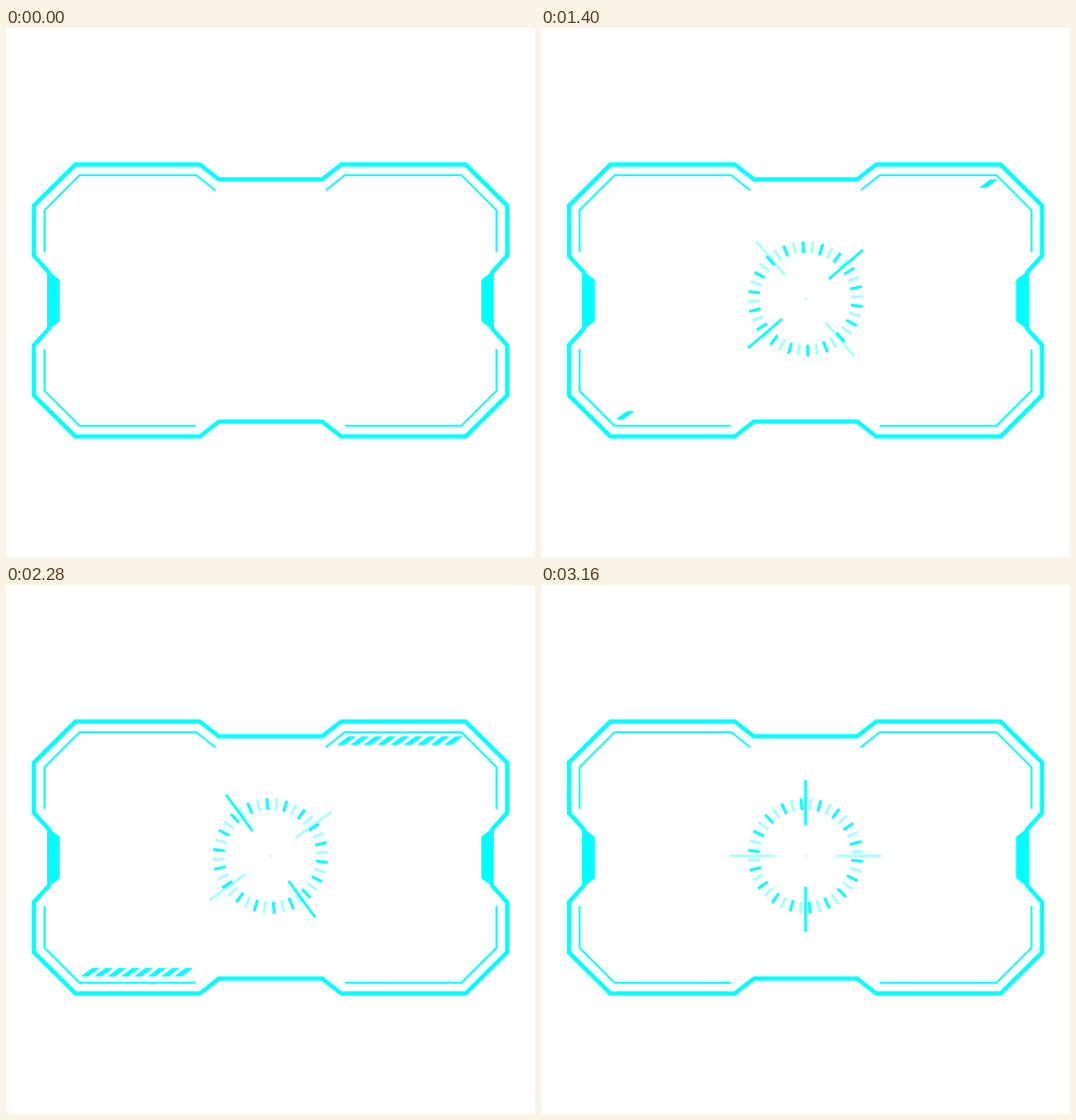
Recreate the animation shown at these times as an HTML page. Size 748 px wide and 748 px high, loop 3200 ms.

```html
<!DOCTYPE html>
<html lang="en">
<head>
<meta charset="utf-8">
<title>HUD frame</title>
<style>
  html, body { margin: 0; width: 100%; height: 100%; overflow: hidden; background: #fff; }
  svg { display: block; width: 100%; height: 100%; }
</style>
</head>
<body>
<svg viewBox="0 0 748 748" fill="none" stroke="#0ff">
  <path stroke-width="6" d="M62 347L39.5 322V251L98 193H274L301 214H447L474 193H650L708.500 251V322L686 347
    M62 423.500L39.500 448.500V519.500L98 577.500H274L301 556.500H447L474 577.500H650L708.500 519.500V448.500L686 423.500"/>
  <path fill="#0ff" stroke="none" d="M58 342L76 356V414.500L58 428.500ZM690 342L672 356V414.500L690 428.500Z"/>
  <path stroke-width="2.700" d="M54.500 316.500V257.500L104 208H269L296 229.500M693.500 316.500V257.500L644 208H479L452 229.500
    M54.500 454V513L104 562.300H268.500M693.500 454V513L644 562.300H479.500"/>
  <g id="topBars" fill="#0ff" stroke="none"></g>
  <g id="bottomBars" fill="#0ff" stroke="none"></g>
  <g id="ring" stroke-width="4"></g>
  <g id="cross" stroke-width="3.600">
    <path d="M0 -107V-43.500M0 43.500V107"/>
    <path opacity=".35" d="M-107 0H-43.500M43.500 0H107"/>
    <circle r="1.700" fill="#0ff" stroke="none" opacity=".35"/>
  </g>
</svg>
<script>
const LOOP = 3200, FRAME = 40, BARS = 9, PITCH = 18.9, STEP = 80;
const byId = id => document.getElementById(id);
const clamp = (v, lo, hi) => Math.min(hi, Math.max(lo, v));
const progress = (t, start, length) => clamp((t - start) / length, 0, 1);
const smooth = u => u * u * (3 - 2 * u);

function addPath(parent, d, opacity = 1) {
  const path = document.createElementNS('http://www.w3.org/2000/svg', 'path');
  path.setAttribute('d', d);
  path.setAttribute('opacity', opacity);
  parent.append(path);
  return path;
}

// Bars are listed in the order in which they light up.
function makeBars(id, x, y, direction) {
  return Array.from({ length: BARS }, (_, i) =>
    addPath(byId(id), `M${x + direction * i * PITCH} ${y}l16 -12h10.8l-16 12z`));
}
const topBars = makeBars('topBars', 468, 226, 1);
const bottomBars = makeBars('bottomBars', 256.8, 553.5, -1);

const ring = byId('ring'), cross = byId('cross');
for (let i = 0; i < 36; i++) {
  addPath(ring, 'M0 -81.5V-65', i % 2 ? 0.35 : 1).setAttribute('transform', `rotate(${i * 10})`);
}

function showBars(bars, t, starts) {
  const start = starts.filter(s => s <= t).pop() ?? Infinity;
  const tick = Math.floor((t - start) / STEP);
  bars.forEach((bar, i) => {
    const lit = tick >= i && tick < i + BARS + 1;
    bar.setAttribute('visibility', lit ? 'visible' : 'hidden');
  });
}

function place(node, angle, scale) {
  node.setAttribute('transform', `translate(374 383) rotate(${angle}) scale(${scale})`);
  node.setAttribute('visibility', scale > 0 ? 'visible' : 'hidden');
}

function render(t) {
  showBars(topBars, t, [40, 1640]);
  showBars(bottomBars, t, [40, 1480]);
  place(ring, 360 * t / LOOP, smooth(progress(t, 0, 800)));
  const turn = 90 * (progress(t, 960, 800) + progress(t, 1800, 800));
  place(cross, turn, smooth(progress(t, 200, 800)));
}

const origin = performance.now();
function loop() {
  const t = (performance.now() - origin) % LOOP;
  render(Math.floor(t / FRAME) * FRAME);
  requestAnimationFrame(loop);
}
loop();
</script>
</body>
</html>
```
